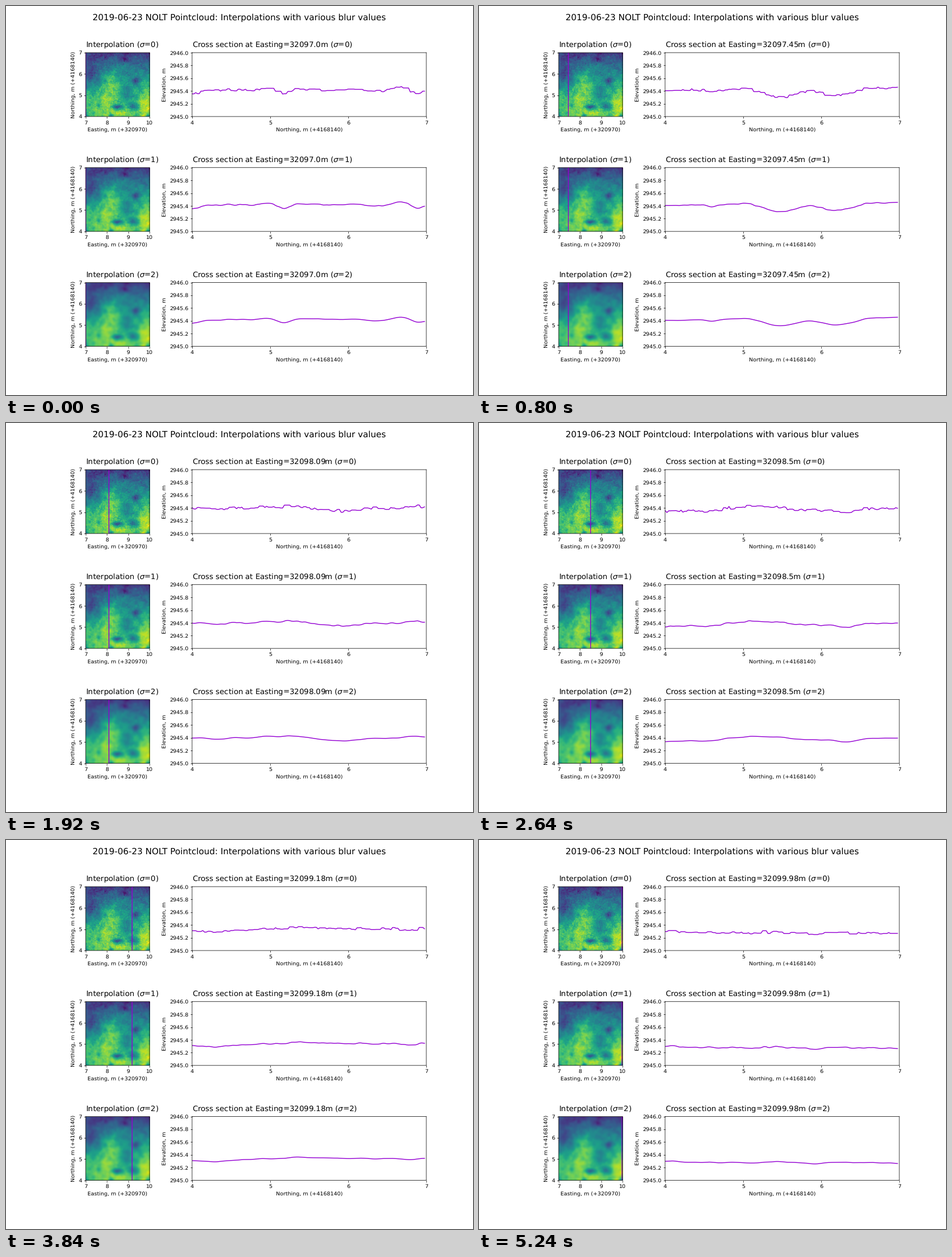
A matplotlib script for the animation above (5280 ms loop, 820 px wide and 683 px high).

```python
import numpy as np
import matplotlib.pyplot as plt
from matplotlib.animation import FuncAnimation

W, H = 820, 683
DPI = W / 12
N = 132
VIOLET = "#9400d3"
SITE = "NOLT"

# Subpixel placement of frames and glyphs
plt.rcParams.update({"path.snap": False, "text.hinting": "none"})

# Crests and hollows on the slope: x, y, width, depth, height in cm
BUMPS = [
    (9.85, 4.60, .25, .60, 5.5), (8.65, 4.13, .25, .10, 5),
    (7.20, 5.90, .35, .45, -5), (7.00, 4.00, .10, .12, -6),
    (8.20, 4.00, .06, .08, -8), (8.47, 4.44, .15, .07, -11),
    (9.20, 4.47, .20, .12, -8), (9.00, 5.05, .25, .25, -4),
    (9.33, 5.66, .12, .10, -8), (8.82, 6.66, .14, .08, -4),
    (7.58, 4.50, .10, .10, -4), (9.88, 4.00, .06, .06, -9),
]

rng = np.random.default_rng(23)
cells = np.arange(N)
north = 4 + cells * 3 / N


def bell(d, width):
    return np.exp(-(d / width) ** 2 / 2)


def blur(z, sigma):
    if sigma == 0:
        return z
    k = bell(cells[:, None] - cells, sigma)
    k /= k.sum(axis=1, keepdims=True)
    return k @ z @ k.T


def surface():
    """Height in cm above 2945 m: a northward slope, a slanted ridge, bumps."""
    x, y = np.meshgrid(3 + north, north)
    z = 41 - 1.5 * (y - 4) ** 2
    z += 4.5 * bell(x - 7.9 - .22 * (y - 4.5), .3) * bell(y - 5.3, .8)
    for bx, by, width, depth, height in BUMPS:
        z += height * bell(x - bx, width) * bell(y - by, depth)
    rough = blur(rng.normal(size=(N, N)), 3)
    return z + .8 * rough / rough.std()


def scatter_resample(z, count=4500):
    """Sample noisy scattered points, then give each cell its nearest one."""
    px, py = rng.uniform(-.5, N - .5, (2, count))
    col, row = (np.clip(np.rint(p), 0, N - 1).astype(int) for p in (px, py))
    h = z[row, col] + rng.normal(0, 1, count)
    dx2 = (px - cells[:, None]) ** 2
    return np.array([h[(dx2 + (py - r) ** 2).argmin(axis=1)] for r in cells])


heights = scatter_resample(surface()) / 100
maps = [2945 + blur(heights, s) for s in range(3)]

fig = plt.figure(figsize=((W + .01) / DPI, (H + .01) / DPI), dpi=DPI)
fig.suptitle(f"2019-06-23 {SITE} Pointcloud: Interpolations with various blur values",
             fontsize=16)
grid = fig.add_gridspec(3, 3, left=.125, right=.9, top=.88, bottom=.125,
                        hspace=.8, wspace=.2)


def titled(ax, text):
    return ax.set_title(text, loc="left", fontsize=14, pad=10)


cuts, curves, titles = [], [], []
for s, z in enumerate(maps):
    ax = fig.add_subplot(grid[s, 0])
    ax.imshow(z, origin="lower", extent=(7, 10, 4, 7), cmap="viridis",
              vmin=2945.24, vmax=2945.48)
    cuts += ax.plot([7, 7], [4, 7], color=VIOLET, lw=1.5)
    ax.set(xlim=(7, 10), ylim=(4, 7), xticks=range(7, 11), yticks=range(4, 8),
           xlabel="Easting, m (+320970)", ylabel="Northing, m (+4168140)")
    titled(ax, rf"Interpolation ($\sigma$={s})")

    ax = fig.add_subplot(grid[s, 1:])
    curves += ax.plot(north, z[0], color=VIOLET, lw=1.5)
    ax.set(xlim=(4, 7), ylim=(2945, 2946), xticks=range(4, 8),
           xlabel="Northing, m (+4168140)", ylabel="Elevation, m")
    ticks = 2945 + np.arange(6) / 5
    ax.set_yticks(ticks, [f"{t:.1f}" for t in ticks])
    titles.append(titled(ax, ""))


def update(i):
    offset = i * 3 / N
    for s in range(3):
        cuts[s].set_xdata([7 + offset] * 2)
        curves[s].set_ydata(maps[s][i])
        titles[s].set_text(rf"Cross section at Easting={round(32097 + offset, 2)}m"
                           rf" ($\sigma$={s})")
    return cuts + curves + titles


anim = FuncAnimation(fig, update, frames=N, interval=40, repeat=True,
                     repeat_delay=0)
plt.show()
```
